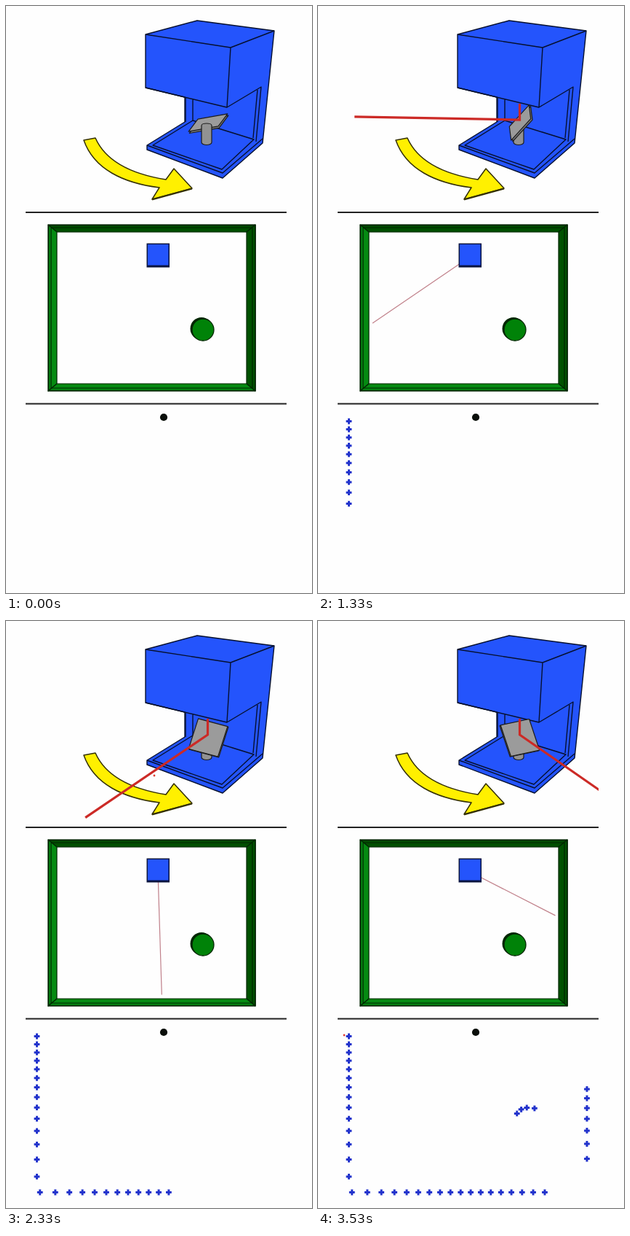
Write an HTML page that moves like this. It is 421 px wide and 805 px high and loops after 3.59 s.

```html
<!DOCTYPE html>
<html lang="en">
<head>
<meta charset="utf-8">
<title>Rotating mirror scanner</title>
<style>
  html, body { margin: 0; width: 100%; height: 100%; overflow: hidden; background: #fefefe; }
  svg { display: block; width: 421px; height: 805px; filter: blur(0.5px); }
  .line { fill: none; stroke: #06102e; stroke-width: 1.4; stroke-linejoin: round; }
  .edge { stroke: #1c1c1c; stroke-width: 1.2; stroke-linejoin: round; }
  .laser { fill: none; stroke: #cc2a26; stroke-width: 3.2; }
</style>
</head>
<body>
<svg viewBox="0 0 421 805">
  <defs>
    <clipPath id="view"><path d="M0 0H386V283H0Z"/></clipPath>
  </defs>

  <!-- scanner -->
  <path class="line" style="fill:#2454fc"
    d="M192 39L263 20L369 34L353 188L298 236L194 197V191L246 159V125L192 112Z"/>
  <path class="line" d="M192 39L309 57L369 34M309 57L304 139M192 112L304 139L351 111L344 186
    M346 115L340 181M247 125V159M257 128V157M194 191L298 229L353 182M202 191L257 157L341 183L297 224Z"/>
  <g id="mount">
    <path id="post" class="edge" fill="#929292" d="M269 164V187A7 3.5 0 0 0 283 187V164A7 3 0 0 0 269 164Z"/>
    <g id="mirror">
      <path id="back" class="edge" fill="#777"/>
      <path id="front" class="edge" fill="#9b9b9b"/>
    </g>
  </g>

  <!-- turning arrow -->
  <path d="M107 184L123 181C138 215 176 231 220 238L231 223L256 250L201 265L211 249C162 243 121 224 107 184Z"
    fill="#fff000" stroke="#332f00" stroke-width="1.5" stroke-linejoin="round"/>
  <path d="M201 265.5L256 250.5" stroke="#332f00" stroke-width="2"/>
  <path id="beam" class="laser" clip-path="url(#view)"/>

  <path d="M27 283H386M27 545.5H386" stroke="#222" stroke-width="2.2"/>

  <!-- room -->
  <g class="edge" style="stroke:#002600">
    <path fill="#004f00" d="M58 300H343L331 310H70Z"/>
    <path fill="#005200" d="M343 300V528L331 518V310Z"/>
    <path fill="#058a12" d="M58 300L70 310V518L58 528Z"/>
    <path fill="#058a12" d="M58 528L70 518H331L343 528Z"/>
    <path fill="none" d="M62 304H339V524H62Z"/>
    <path fill="none" stroke-width="1.6" d="M58.5 300.5H343V527.5H58.5Z"/>
  </g>
  <path id="ray" stroke="#c0808a" stroke-width="1.2"/>
  <path fill="#0a1440" d="M193.5 325.5H225V358.5H193.5Z"/>
  <path fill="#2454fc" d="M195 327H223.5V355.5H195Z"/>
  <circle cx="269" cy="442.5" r="15.5" fill="#002600"/>
  <circle cx="271" cy="444" r="15" fill="#008208" stroke="#002600" stroke-width="1.3"/>

  <!-- scan -->
  <circle cx="217" cy="564" r="5.1" fill="#0a0f0a"/>
  <path id="points" fill="none" stroke="#2233cc" stroke-width="3"/>
  <circle id="spot" r="1.4" fill="#dd3b2e"/>
</svg>
<script>
const LOOP = 3590, STEP = 1000 / 15;
const el = id => document.getElementById(id);
const [mount, post, mirror, back, front, beam, ray, points, spot] =
  ['mount', 'post', 'mirror', 'back', 'front', 'beam', 'ray', 'points', 'spot'].map(el);

// [tick, sample number], including the short stalls of the sweep
const SWEEP = [[0, -8], [5, -3], [6, -3], [7, -1], [14, 6], [15, 6], [17, 8], [19, 8],
  [20, 10], [24, 14], [29, 19], [35, 26], [36, 26], [37, 28], [43, 34], [53, 43]];
// [first tick, end tick, x, y]
const SPOTS = [[24, 25, 251, 161], [29, 30, 266, 162], [34, 45, 204, 212], [53, 54, 36, 568]];
const PILLAR = { 33: 125, 34: 123, 35: 125, 36: 132 };

const angle = n => (3.6 * n - 1.8) * Math.PI / 180;

function sampleAt(tick) {
  const i = Math.max(1, SWEEP.findIndex(p => p[0] >= tick));
  const [k0, n0] = SWEEP[i - 1], [k1, n1] = SWEEP[i];
  return Math.round(n0 + (n1 - n0) * (tick - k0) / (k1 - k0));
}

function hit(n, ox, oy, scale) {
  const c = Math.cos(angle(n)), s = Math.sin(angle(n));
  const wall = Math.min(c > 0 ? 174.5 / c : 153 / -c, 219.5 / s);
  const range = (PILLAR[n] || wall) * scale;
  return [ox - c * range, oy + s * range];
}

// horizontal direction in the oblique view of the scanner
const heading = a => [-1.65 * Math.cos(a) - Math.sin(a), -0.468 * Math.cos(a) + 0.627 * Math.sin(a)];

function quad(x, y, [sx, sy], [ex, ey]) {
  const corners = [[-1, -1], [1, -1], [1, 1], [-1, 1]].map(([i, j]) =>
    (x + (i * sx + j * ex) / 2).toFixed(1) + ' ' + (y + (i * sy + j * ey) / 2).toFixed(1));
  return 'M' + corners.join('L') + 'Z';
}

function drawMirror(a) {
  const d = heading(a);
  const side = heading(a + Math.PI / 2).map(v => v * 24);
  const rise = [-14 * d[0], -18 * d[1] - 30];
  front.setAttribute('d', quad(278, 160, side, rise));
  back.setAttribute('d', quad(278 - d[0] * 1.2, 161.5 - d[1] * 1.2, side, rise));
  const turnedAway = side[0] * rise[1] - side[1] * rise[0] > 0;
  mount.append(turnedAway ? post : mirror);
}

function drawBeam(a) {
  const d = heading(a);
  const length = 1 / (0.00818 + 0.00206 * Math.cos(a) - 0.00247 * Math.sin(a));
  beam.setAttribute('d', `M277.5 134V156L${277 + d[0] * length} ${156 + d[1] * length}`);
}

function draw(t) {
  const tick = Math.floor((t + 4) / STEP);
  const n = sampleAt(tick), lit = n >= 1;
  drawMirror(angle(n));
  beam.style.display = ray.style.display = lit ? '' : 'none';
  let d = '';
  for (let i = 1; i <= n; i++) {
    const [x, y] = hit(i, 217, 564, 1);
    d += `M${x - 3.9} ${y}h7.8M${x} ${y - 3.9}v7.8`;
  }
  points.setAttribute('d', d);
  if (lit) {
    drawBeam(angle(n));
    ray.setAttribute('d', 'M209 344L' + hit(n, 209, 344, 0.768).join(' '));
  }
  const mark = SPOTS.find(([from, to]) => tick >= from && tick < to);
  spot.style.display = mark ? '' : 'none';
  if (mark) {
    spot.setAttribute('cx', mark[2]);
    spot.setAttribute('cy', mark[3]);
  }
}

const start = performance.now();
function frame() {
  draw((performance.now() - start) % LOOP);
  requestAnimationFrame(frame);
}
frame();
</script>
</body>
</html>
```
